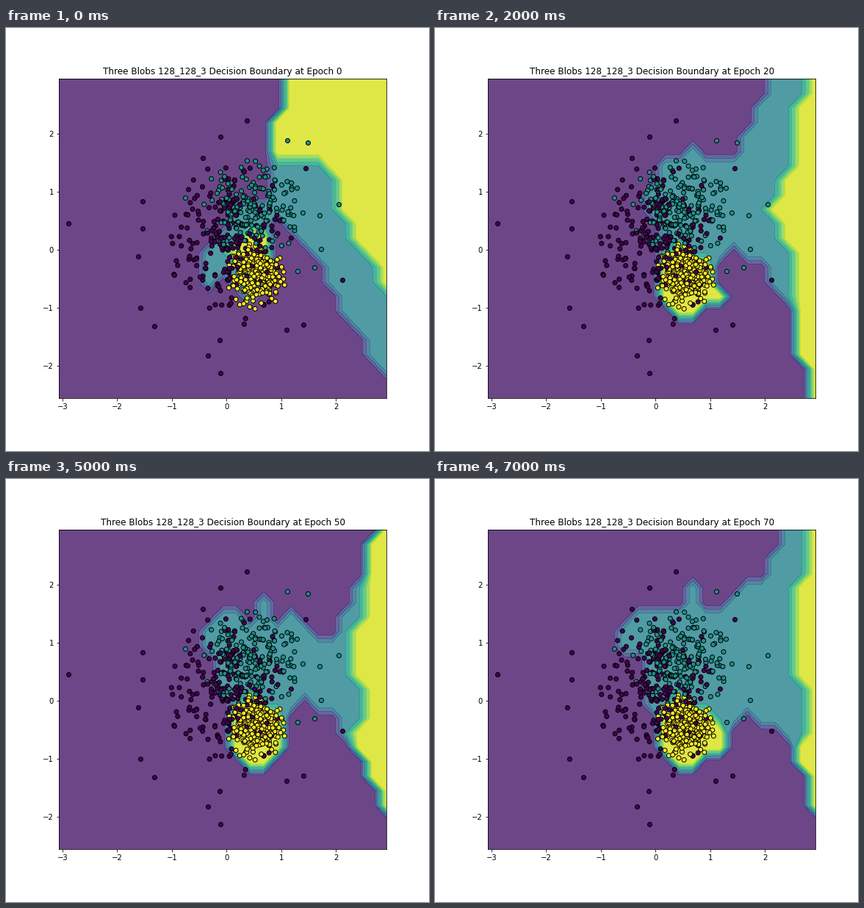
Write a matplotlib script that moves like this. It is 576x576 px and loops after 8 s.

```python
import numpy as np
import matplotlib.pyplot as plt
from matplotlib.animation import FuncAnimation

SIZE, DPI, STEP = 576, 72, 0.25
LEFT, TOP = -3.068, 2.945
COLS, ROWS = 25, 23
RIGHT, BOTTOM = LEFT + STEP * (COLS - 1), TOP - STEP * (ROWS - 1)
PURPLE, TEAL, YELLOW = 0, 1, 2

rng = np.random.default_rng(7)
row, col = np.mgrid[:ROWS, :COLS]


def polyline(points):
    """Row of a (column, row) polyline at every grid node, rounded."""
    x, y = zip(*points)
    return np.floor(np.interp(col, x, y) + 0.5)


def band(top, bottom):
    """Nodes between two polylines, from their first column to the right."""
    inside = (row >= polyline(top)) & (row <= polyline(bottom))
    return inside & (col >= top[0][0])


def right_of(steps):
    """Nodes right of an edge that jumps to a new column at given rows."""
    starts = list(steps)
    edges = np.array(list(steps.values()))
    return col >= edges[np.searchsorted(starts, row, side="right") - 1]


def ellipse(cx, cy, rx, ry):
    return ((col - cx) / rx) ** 2 + ((row - cy) / ry) ** 2 <= 1


def class_map(top, bottom, edge, *cores):
    """Predicted class on the coarse grid; row 0 is the top."""
    z = np.where(band(top, bottom), TEAL, PURPLE)
    for part in (right_of(edge), *(ellipse(*c) for c in cores)):
        z[part] = YELLOW
    return z


ROUND = (14.45, 14.1, 2, 2.17)
TIP = (17, 15, 0.5, 0.5)
WEDGE = [(13, 13), (17, 12), (18, 11), (19, 12), (20, 12), (22, 15)]
SHELF = [(19, 12), (22, 14)]

# One map per ten epochs: teal top, teal bottom, right yellow edge, cores.
maps = [
    class_map([(11, 12), (13, 9), (15, 9), (16, 6)],
              [(11, 14), (12, 13), (14, 15), (15, 14), (16, 9), (19, 12),
               (21, 16), (24, 20)],
              {0: 17, 3: 16, 6: 20, 7: 21, 10: 22, 12: 23, 13: 24, 15: 25},
              (14.3, 12, 1.35, 1.35)),
    class_map([(10, 7), (11, 6), (14, 6), (15, 5), (16, 6), (17, 6), (18, 5),
               (19, 5), (20, 2), (21, 0)],
              [(10, 7), (11, 9), (12, 13), (17, 12), (18, 11), (20, 13),
               (22, 17), (23, 18)],
              {0: 24, 2: 23, 7: 22, 8: 21, 11: 22, 13: 23, 18: 24},
              (14.45, 14.6, 2.6, 2.7)),
    class_map([(12, 8), (13, 6), (14, 6), (15, 5), (16, 6), (18, 6), (20, 2),
               (21, 0)],
              [(12, 9)] + WEDGE,
              {0: 24, 2: 23, 7: 22, 9: 21, 10: 22, 12: 23, 20: 24},
              ROUND, TIP),
    class_map([(13, 7), (14, 7), (15, 6), (16, 7), (17, 6), (18, 7), (19, 7),
               (20, 6), (21, 2), (22, 0)],
              WEDGE,
              {0: 24, 1: 23, 7: 22, 9: 21, 10: 22, 11: 23, 19: 24, 21: 25},
              ROUND, TIP),
    class_map([(12, 7), (14, 7), (15, 6), (16, 7), (17, 6), (18, 7), (20, 7),
               (21, 5), (22, 0)],
              [(12, 9)] + WEDGE,
              {0: 24, 1: 23, 7: 22, 11: 23, 18: 24, 20: 25},
              ROUND),
    class_map([(11, 7), (12, 6), (13, 6), (14, 7), (15, 5), (16, 7), (17, 6),
               (19, 8), (20, 8), (22, 4)],
              [(11, 8)] + WEDGE,
              {0: 24, 1: 23, 7: 22, 11: 23, 14: 22, 16: 23, 18: 24, 20: 25},
              ROUND),
    class_map([(13, 7), (14, 7), (15, 5), (16, 7), (17, 6), (18, 6), (19, 7),
               (20, 7), (22, 3)],
              [(13, 12)] + SHELF,
              {0: 24, 2: 23, 12: 24, 15: 23, 17: 24, 19: 25},
              ROUND),
    class_map([(10, 7), (11, 6), (14, 6), (15, 4), (16, 6), (17, 6), (19, 4),
               (20, 4), (22, 0)],
              [(11, 8), (12, 12), (18, 13)] + SHELF,
              {0: 24, 4: 23, 11: 24, 15: 23, 17: 24, 20: 25},
              ROUND, (17, 14.5, 0.6, 0.6)),
]


def cloud(n, cx, cy, sx, sy, reach):
    """n seeded normal points in pixels, cut off at `reach` deviations."""
    p = rng.normal(size=(3 * n, 2))
    p = p[np.hypot(p[:, 0], p[:, 1]) < reach][:n]
    return p * (sx, sy) + (cx, cy)


# The few far strays are placed; the rest are seeded clouds.
purple_far = [
    (85, 266), (186, 236), (186, 273), (180, 311), (183, 381), (202, 406),
    (268, 177), (292, 148), (328, 126), (408, 191), (275, 446), (292, 470),
    (291, 425), (382, 411), (405, 404), (458, 343)]
teal_far = [
    (383, 153), (411, 156), (453, 240), (427, 255), (429, 301), (420, 326),
    (397, 331), (244, 231)]

groups = [
    np.vstack([purple_far, cloud(215, 304, 296, 43, 53, 2.1)]),
    np.vstack([teal_far, cloud(195, 336, 245, 33, 30, 2.2)]),
    cloud(235, 339, 339, 19, 21, 2.2)]
points = np.vstack(groups) + 0.5
labels = np.repeat([PURPLE, TEAL, YELLOW], [len(g) for g in groups])
order = rng.permutation(len(points))
points, labels = points[order], labels[order]

fig, ax = plt.subplots(figsize=(SIZE / DPI, SIZE / DPI), dpi=DPI)
fig.subplots_adjust(left=0.125, right=0.9, bottom=0.125, top=0.88)
ax.set_xlim(LEFT, RIGHT)
ax.set_ylim(BOTTOM, TOP)

px, py = ax.transData.inverted().transform(
    np.column_stack([points[:, 0], SIZE - points[:, 1]])).T
ax.scatter(px, py, c=labels, s=36, cmap="viridis", edgecolors="k",
           linewidths=1, zorder=2)

xs = np.linspace(LEFT, RIGHT, COLS)
ys = np.linspace(TOP, BOTTOM, ROWS)
levels = np.linspace(0, 2, 9)
shown = []


def update(i):
    while shown:
        shown.pop().remove()
    shown.append(ax.contourf(xs, ys, maps[i], levels=levels, cmap="viridis",
                             alpha=0.8, zorder=1))
    ax.set_title(f"Three Blobs 128_128_3 Decision Boundary at Epoch {10 * i}")


anim = FuncAnimation(fig, update, frames=len(maps), init_func=lambda: None,
                     interval=1000, repeat=True, repeat_delay=0)
plt.show()
```
